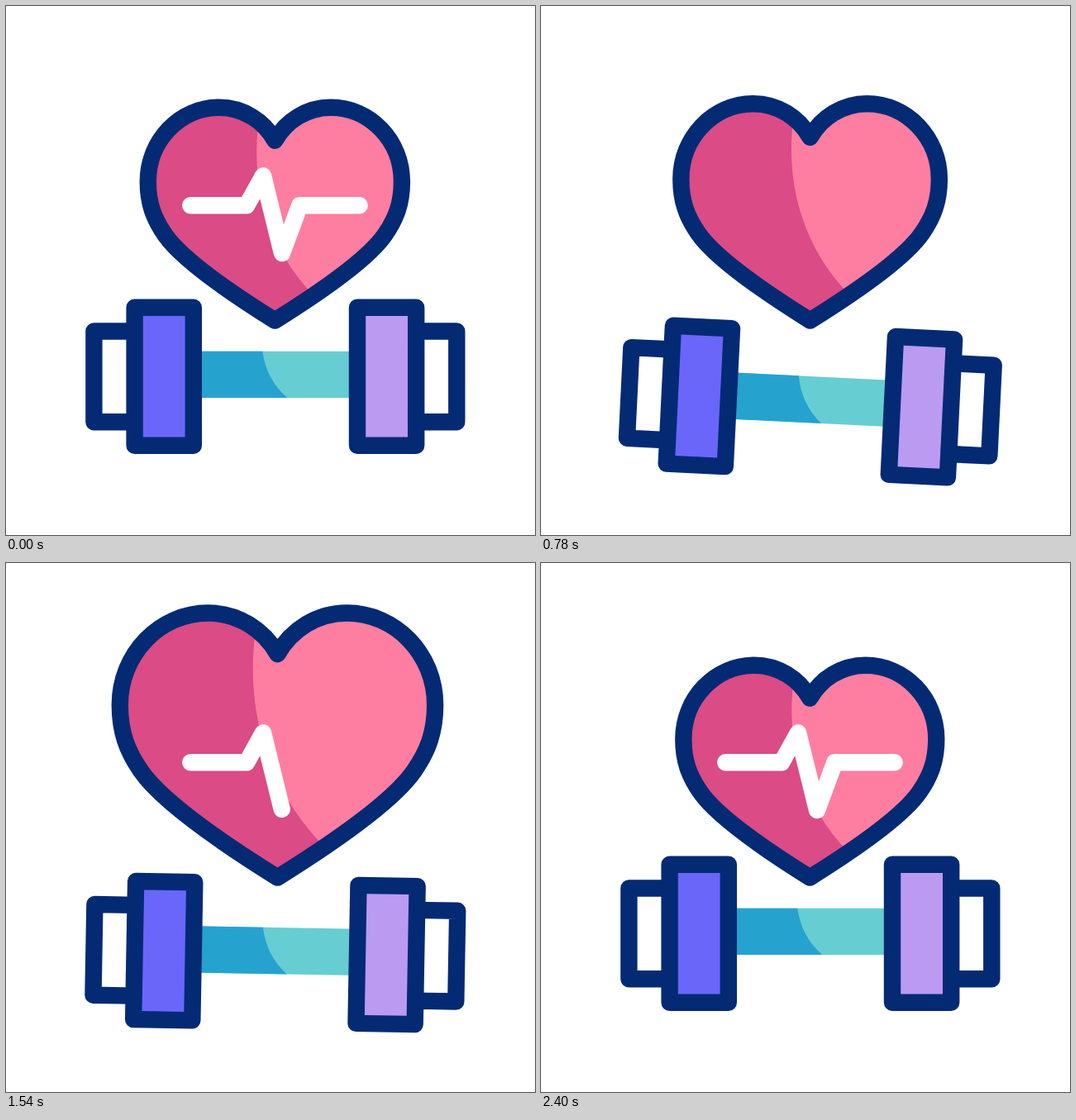
Animation, 640 px wide and 640 px high, one loop 2.42 s. Source, as an HTML page:

```html
<!DOCTYPE html>
<html lang="en">
<head>
<meta charset="utf-8">
<style>
  html, body { margin: 0; height: 100%; overflow: hidden; background: #fff; }
  svg { display: block; width: 100vw; height: 100vh; }
  .outline { stroke: #042a74; stroke-width: 20.4; stroke-linejoin: round; }
</style>
</head>
<body>
<svg viewBox="0 0 640 640" fill="none">
  <defs>
    <path id="heart" d="M325.3 163.6C312 140 287 123.7 258 123.7C210.7 123.7 172.3 163.7 172.3 213C172.3 239 179 257.5 193 277.5C214 307.5 274 348.5 325.3 380.5C376.6 348.5 436.6 307.5 457.6 277.5C471.6 257.5 478.3 239 478.3 213C478.3 163.7 439.9 123.7 392.6 123.7C363.6 123.7 338.6 140 325.3 163.6Z"/>
    <clipPath id="heartClip"><use href="#heart"/></clipPath>
  </defs>
  <use href="#heart" fill="#fe7ea1"/>
  <g clip-path="url(#heartClip)">
    <path id="shade" fill="#db4b85" d="M306 140C296 210 313 290 372 350V400H150V100H306Z"/>
  </g>
  <use id="rim" href="#heart" class="outline"/>
  <path id="pulse" pathLength="1" stroke="#fff" stroke-width="20.4" stroke-linecap="round" stroke-linejoin="round"
    d="M223.2 241.3H291.2L311 205.5L334 299L355.3 241.3H427.7"/>
  <g id="dumbbell">
    <path fill="#66cdd2" d="M227 417.7H425V474H227Z"/>
    <path fill="#26a2cf" d="M227 417.7H310.3Q315 452 340.3 474H227Z"/>
    <path class="outline" d="M155.5 393.5H106.4V503.3H155.5M496.5 393.5H545.3V503.3H496.5"/>
    <path class="outline" fill="#6a66fa" d="M155.6 364.7H226.8V531.8H155.6Z"/>
    <path class="outline" fill="#bb9af2" d="M425 364.7H496.2V531.8H425Z"/>
  </g>
</svg>
<script>
const LOOP = 2420, END = 2400, HALF = 600, FALL = 300;
const [heart, shade, rim, pulse, dumbbell] =
  ['heart', 'shade', 'rim', 'pulse', 'dumbbell'].map(id => document.getElementById(id));

const mix = (a, b, k) => a + (b - a) * k;
const smooth = u => u * u * (3 - 2 * u);

// cubic-bezier(0, 0, 0.1, 1)
function burst(u) {
  let lo = 0, hi = 1;
  for (let i = 0; i < 24; i++) {
    const s = (lo + hi) / 2;
    if (s * s * (0.3 * (1 - s) + s) < u) lo = s; else hi = s;
  }
  return smooth(lo);
}

function scaleAbout(shape, x, y, scale) {
  shape.setAttribute('transform', `translate(${x} ${y}) scale(${scale}) translate(${-x} ${-y})`);
}

function draw(t) {
  const step = Math.min(3, Math.floor(t / HALF));
  const local = t - step * HALF;
  const k = smooth(local / HALF);
  const rising = step % 2 === 0;

  const swell = rising ? burst(local / HALF) : 1 - burst(Math.min(1, local / FALL));
  const scale = 1 + 0.272 * swell;
  scaleAbout(heart, 312.4, 380.5, scale);
  scaleAbout(shade, 321.9, 380.5, scale);
  rim.style.strokeWidth = 20.4 / scale; // constant line weight

  const angles = [0, 5, -5, 5, 0];
  const drop = 38.8 * (rising ? k : 1 - k);
  dumbbell.setAttribute('transform', `translate(0 ${drop}) rotate(${mix(angles[step], angles[step + 1], k)} 325.9 448.2)`);

  // The pulse is wiped away, stays hidden, then is drawn again.
  const from = step === 0 ? k : 0;
  const to = step === 1 ? 0 : step === 2 ? k : 1;
  pulse.style.display = to - from > 0.0005 ? '' : 'none';
  pulse.style.strokeDasharray = `${to - from} 3`;
  pulse.style.strokeDashoffset = -from;
}

function tick() {
  draw(Math.min(END, performance.now() % LOOP));
  requestAnimationFrame(tick);
}
tick();
</script>
</body>
</html>
```
